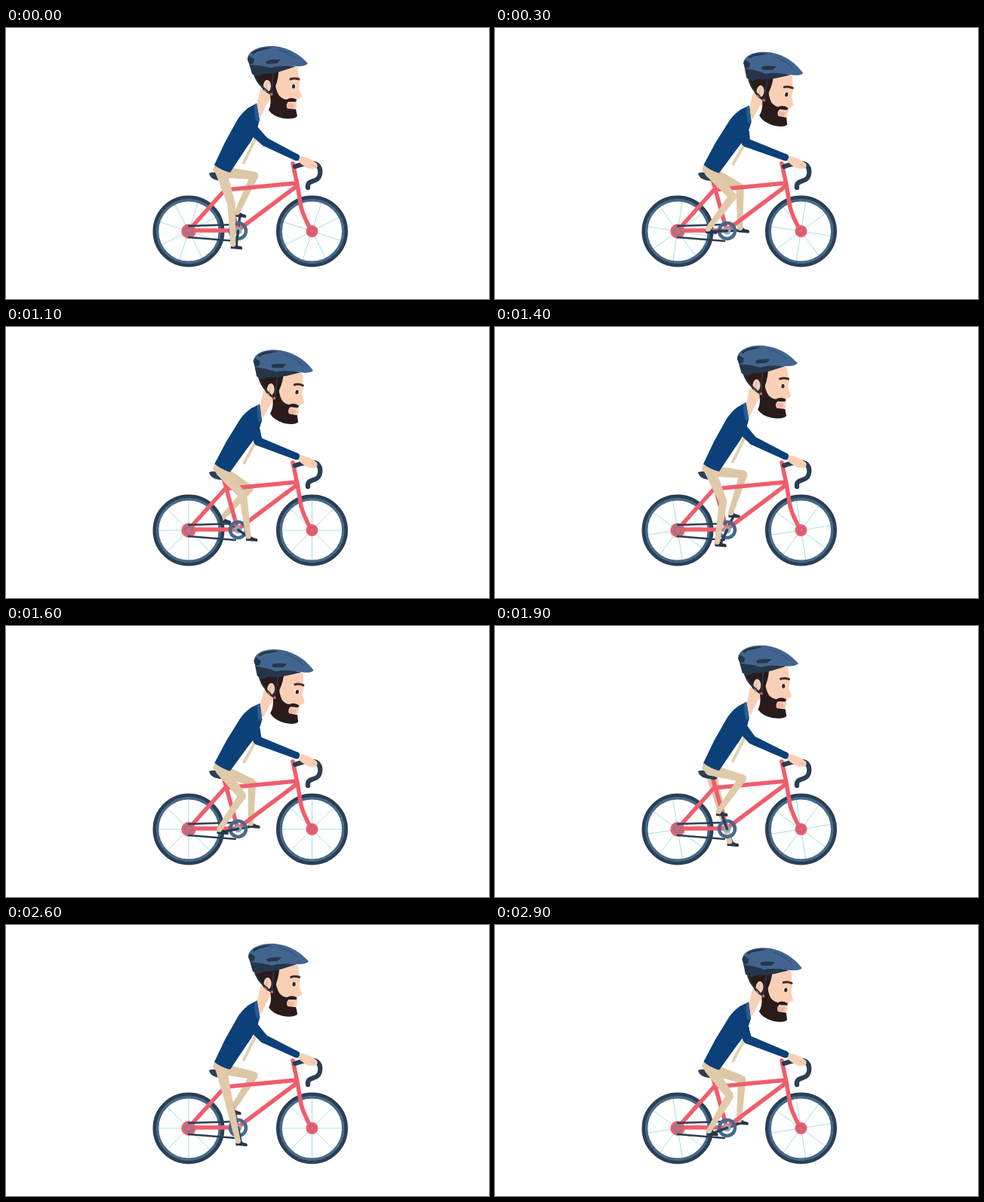
An HTML page with a canvas that plays this animation: 640 px wide and 360 px high, repeating every 3 s.

```html
<!DOCTYPE html>
<html>
<head>
<meta charset="utf-8">
<style>
html, body { margin: 0; width: 100%; height: 100%; overflow: hidden; background: #fff; }
canvas { display: block; }
</style>
</head>
<body>
<canvas id="stage" width="640" height="360"></canvas>
<script>
const ctx = document.getElementById('stage').getContext('2d');
const LOOP = 3000, STEP = 100, RAD = Math.PI / 180;
const NAVY = '#2b3f55', STEEL = '#456a8b', RED = '#f05d6c', SHIRT = '#0c4079',
      SKIN = '#f9d0b6', PANTS = '#e0caa9', FAR_PANTS = '#dcc8a6', HAIR = '#2a1b1b',
      HELMET = '#42658f', DARK = '#26364a';
const HIP = [285, 191], CRANK = [307.5, 269.5], PEDAL_RADIUS = 21.3;
const REAR = [242, 270], FRONT = [405.5, 270];

function fill(d, color) {
  ctx.fillStyle = color;
  ctx.fill(new Path2D(d));
}

function line(d, color, width) {
  ctx.strokeStyle = color;
  ctx.lineWidth = width;
  ctx.lineCap = ctx.lineJoin = 'round';
  ctx.stroke(new Path2D(d));
}

function disc([x, y], r, color, ry = r) {
  ctx.fillStyle = color;
  ctx.beginPath();
  ctx.ellipse(x, y, r, ry, 0, 0, 7);
  ctx.fill();
}

function ring([x, y], r, color, width) {
  ctx.strokeStyle = color;
  ctx.lineWidth = width;
  ctx.beginPath();
  ctx.arc(x, y, r, 0, 7);
  ctx.stroke();
}

// Tapered limb through points given as [x, y, radius]
function limb(points, color) {
  points.forEach((p, i) => {
    disc(p, p[2], color);
    if (!i) return;
    const q = points[i - 1], a = Math.atan2(p[1] - q[1], p[0] - q[0]);
    const sx = -Math.sin(a), sy = Math.cos(a);
    ctx.beginPath();
    for (const [[x, y, r], side] of [[q, 1], [p, 1], [p, -1], [q, -1]])
      ctx.lineTo(x + sx * r * side, y + sy * r * side);
    ctx.fill();
  });
}

function turned([x, y], angle, draw) {
  ctx.save();
  ctx.translate(x, y);
  ctx.rotate(angle);
  ctx.translate(-x, -y);
  draw();
  ctx.restore();
}

function kneeFor([x, y], thigh = 44.5, shin = 54) {
  const dx = x - HIP[0], dy = y - HIP[1], d = Math.hypot(dx, dy);
  const along = (thigh ** 2 - shin ** 2 + d * d) / (2 * d);
  const out = Math.sqrt(Math.max(0, thigh ** 2 - along ** 2));
  return [HIP[0] + (dx * along + dy * out) / d, HIP[1] + (dy * along - dx * out) / d];
}

function leg(angle, color) {
  const px = CRANK[0] + PEDAL_RADIUS * Math.cos(angle);
  const py = CRANK[1] + PEDAL_RADIUS * Math.sin(angle);
  const ankle = [px - 4, py - 3.3], knee = kneeFor(ankle);
  line(`M${CRANK}L${px} ${py}`, NAVY, 3.5);
  turned([px, py], .08, () =>
    fill(`M${px - 7} ${py - 3}h7q3 2 7 2q2 1 1 4h-15z`, DARK));
  limb([[...HIP, 7.5], [...knee, 5.2], [...ankle, 3.5]], color);
}

function wheel(center, spin) {
  const [x, y] = center;
  for (let i = 0; i < 8; i++) {
    const a = spin + i * 45 * RAD;
    line(`M${center}L${x + 40 * Math.cos(a)} ${y + 40 * Math.sin(a)}`, '#a5dfe2', 1);
  }
  ring(center, 45, NAVY, 5);
  ring(center, 41.3, STEEL, 3.4);
}

function bike(spin) {
  wheel(REAR, spin);
  wheel(FRONT, spin);
  line('M289 204L307 269M291 215L385 206M384 211L308 268M307 269H242L292 213', RED, 5.5);
  line('M380 180L386 208L391 238Q394 250 405 270', RED, 5.5);
  disc(REAR, 9.7, RED);
  ring(REAR, 5, '#8a7d92', 3);
  disc(FRONT, 8, RED);
  ring(FRONT, 4, '#b5677a', 1.8);
  line('M242 263L306 261M242 278L304 283', NAVY, 2.3);
  ring(CRANK, 10.5, STEEL, 4.5);
  disc(CRANK, 5, '#8fa9bb');
  fill('M269 193Q276 190 284 194L295 202Q291 206 285 203Q271 202 269 193Z', NAVY);
  line('M383 184Q396 179 407 180C419 181 418 197 412 201C406 205 399 203 400 212', NAVY, 6.3);
}

function torso() {
  line('M330 148L315 179', '#e2d1b2', 4);
  fill('M337 80L352 90Q344 103 337 119L331 108Z', SKIN);
  fill('M276 182L298 191L294 197Q283 200 274 189Z', PANTS);
  fill('M332 100L336 122Q332 142 318 160L297 192Q285 189 276 182L290 152L306 123Q311 114 321 106Z', SHIRT);
  fill('M329 102L332 100L336 122L332 124Q328 113 329 102Z', '#2a5c94');
}

function head() {
  fill('M352 52H386L389 71L388 80L392 91L386 95L384 112H360L345 88Z', SKIN);
  fill('M329 53H361Q362 64 357 78L353 89Q342 86 338 78Q329 70 329 53Z', HAIR);
  disc([346, 77], 5, SKIN, 8);
  line('M346 73Q343 77 346 82', '#dfa98f', 1);
  fill('M356 70Q357 82 362 90Q367 95 372 95Q378 91 385 95L384 98L374 98Q370 102 373 107L384 108L386 117Q382 122 367 120Q353 117 348 109Q352 101 350 89Z', HAIR);
  fill('M373 100L382 101L381 106Q376 108 373 105Z', '#efb6a2');
  line('M377 68Q382 66 388 68', '#4a2a27', 3);
  fill('M377 76Q381 73 385 76L383 80Q379 81 377 76Z', '#fff');
  disc([381, 77.5], 2.2, '#3a2622', 2.8);
  line('M328 58Q331 72 342 80L352 89M354 54L352 89', DARK, 2);
  disc([352, 88], 1.7, RED);
  fill('M321 44L326 61Q335 67 340 61Q354 61 366 57L384 51Z', DARK);
  fill('M320 42C320 29 338 23 355 24C376 26 390 36 400 47Q397 51 386 51Q362 49 351 53Q336 49 323 49Z', HELMET);
  fill('M320 42L322 37L329 41L328 47L323 48Z', DARK);
  fill('M325 33Q335 25 352 26L338 30Q331 31 328 35Z', DARK);
  fill('M344 45Q348 41 364 42L359 47L346 48Z', DARK);
  line('M361 29Q376 33 385 41', '#34557f', 1.5);
}

function arm(bob) {
  limb([[328 + 2 * bob, 136 + 2 * bob, 7], [343 - 11 * bob, 151 + bob, 5.8], [385, 172, 4.5]], SHIRT);
  fill('M390 170Q398 172 403 174L412 180Q414 185 410 187L402 187Q394 184 387 177Z', SKIN);
  line('M404 181L410 184', '#e5b196', 1);
}

function draw(time) {
  const t = Math.floor(time % LOOP / STEP) * STEP;
  const turn = .27 * t * RAD, crank = 97 * RAD + turn;
  const bob = (1 + Math.cos(2 * crank - 16 * RAD)) / 2;
  ctx.fillStyle = '#fff';
  ctx.fillRect(0, 0, 640, 360);
  leg(crank + Math.PI, FAR_PANTS);
  bike(18 * RAD + turn);
  leg(crank, PANTS);
  turned([282, 190], .057 * bob, torso);
  turned([277, 135], .105 * bob, head);
  arm(bob);
}

function tick() {
  draw(performance.now());
  requestAnimationFrame(tick);
}
tick();
</script>
</body>
</html>
```
